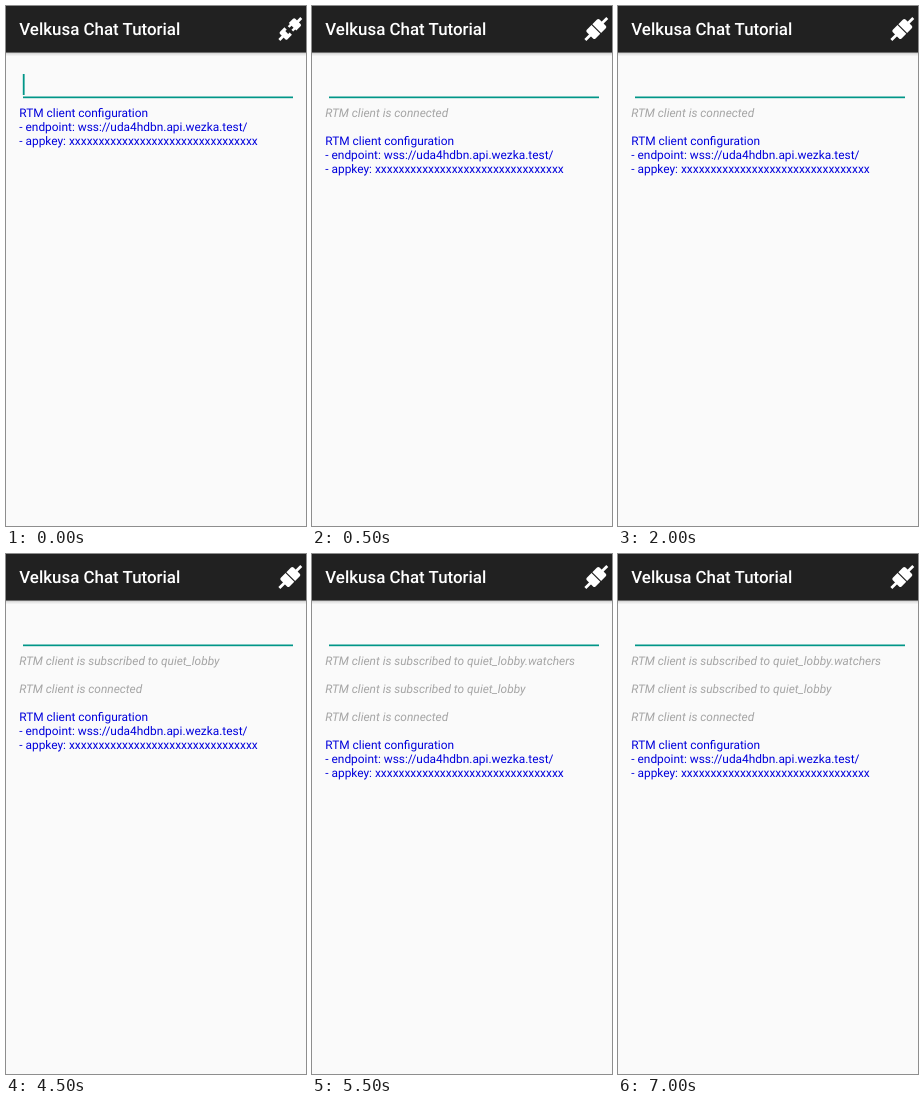
Recreate the animation shown at these times as an HTML page. Size 300 by 520 pixels, loop 8000 ms.

```html
<!DOCTYPE html>
<html lang="en">
<head>
<meta charset="utf-8">
<title>Chat tutorial</title>
<style>
  html, body { margin: 0; width: 100%; height: 100%; overflow: hidden; background: #fafafa; }
  svg { display: block; width: 300px; height: 520px; font: 11.9px Roboto, sans-serif; text-rendering: geometricPrecision; }
  .title { font-size: 16.9px; font-weight: 500; fill: #fff; }
  .config { fill: #0000dc; }
  .note { fill: #a5a5a5; font-style: italic; }
  .icon { fill: #fff; stroke: #fff; stroke-width: 0; }
  .icon .wire { stroke-width: 2.8; }
</style>
</head>
<body>
<svg viewBox="0 0 300 520">
  <defs>
    <linearGradient id="shade" x2="0" y2="1">
      <stop offset="0" stop-color="#000" stop-opacity=".3"/>
      <stop offset=".4" stop-color="#000" stop-opacity=".1"/>
      <stop offset="1" stop-color="#000" stop-opacity="0"/>
    </linearGradient>
  </defs>
  <rect width="300" height="520" fill="#fafafa"/>
  <rect y="46" width="300" height="4.5" fill="url(#shade)"/>
  <rect width="300" height="46.5" fill="#212121"/>
  <text class="title" x="13.3" y="29.4">Velkusa Chat Tutorial</text>

  <g class="icon" transform="translate(284.3 23) rotate(-45)">
    <g id="unplugged">
      <path class="wire" d="M-15.5 0H-9M9 0H15.5"/>
      <path d="M-3 -5.3V-2H-5V2H-3V5.3H-9.2Q-10.8 5.3 -10.8 3.7V-3.7Q-10.8 -5.3 -9.2 -5.3Z"/>
      <path d="M3.2 -5.3H9.2Q10.8 -5.3 10.8 -3.7V3.7Q10.8 5.3 9.2 5.3H3.2V3.8H.2V1.4H3.2V-1.4H.2V-3.8H3.2Z"/>
    </g>
    <g id="plugged">
      <path class="wire" d="M-15.5 0H-8M8 0H15.5"/>
      <path d="M-.6 -6.2V6.2H-7.2Q-9 6.2 -9 4.4V-4.4Q-9 -6.2 -7.2 -6.2Z"/>
      <path d="M.6 -6.2V6.2H7.2Q9 6.2 9 4.4V-4.4Q9 -6.2 7.2 -6.2Z"/>
    </g>
  </g>

  <rect id="caret" x="16.8" y="68" width="1.8" height="21" fill="#009688"/>
  <rect x="17" y="90.5" width="270" height="1.7" fill="#009688"/>
  <g id="log"></g>
</svg>
<script>
const LOOP = 8000, LEFT = 13.3, BASE = 111, LINE = 14;
const $ = id => document.getElementById(id);

const config = [
  'RTM client configuration',
  '- endpoint: wss://uda4hdbn.api.wezka.test/',
  '- appkey: ' + 'x'.repeat(32)
];
const notes = [
  { at: 500, text: 'RTM client is connected' },
  { at: 3000, text: 'RTM client is subscribed to quiet_lobby' },
  { at: 5500, text: 'RTM client is subscribed to quiet_lobby.watchers' }
];

function addLine(text, row, kind) {
  const el = document.createElementNS('http://www.w3.org/2000/svg', 'text');
  el.setAttribute('x', LEFT);
  el.setAttribute('y', BASE + row * LINE);
  el.setAttribute('class', kind);
  el.textContent = text;
  $('log').append(el);
  return el;
}

const show = (el, on) => el.setAttribute('visibility', on ? 'visible' : 'hidden');

config.forEach((text, i) => addLine(text, i, 'config'));
// Each new note sits two rows above the previous one; the log moves down to fit.
notes.forEach((note, i) => note.el = addLine(note.text, -2 * (i + 1), 'note'));

function draw() {
  const t = performance.now() % LOOP;
  const count = notes.filter(note => t >= note.at).length;
  notes.forEach((note, i) => show(note.el, i < count));
  $('log').setAttribute('transform', `translate(0 ${count * 2 * LINE})`);
  show($('unplugged'), count === 0);
  show($('caret'), count === 0);
  show($('plugged'), count > 0);
  requestAnimationFrame(draw);
}
draw();
</script>
</body>
</html>
```
